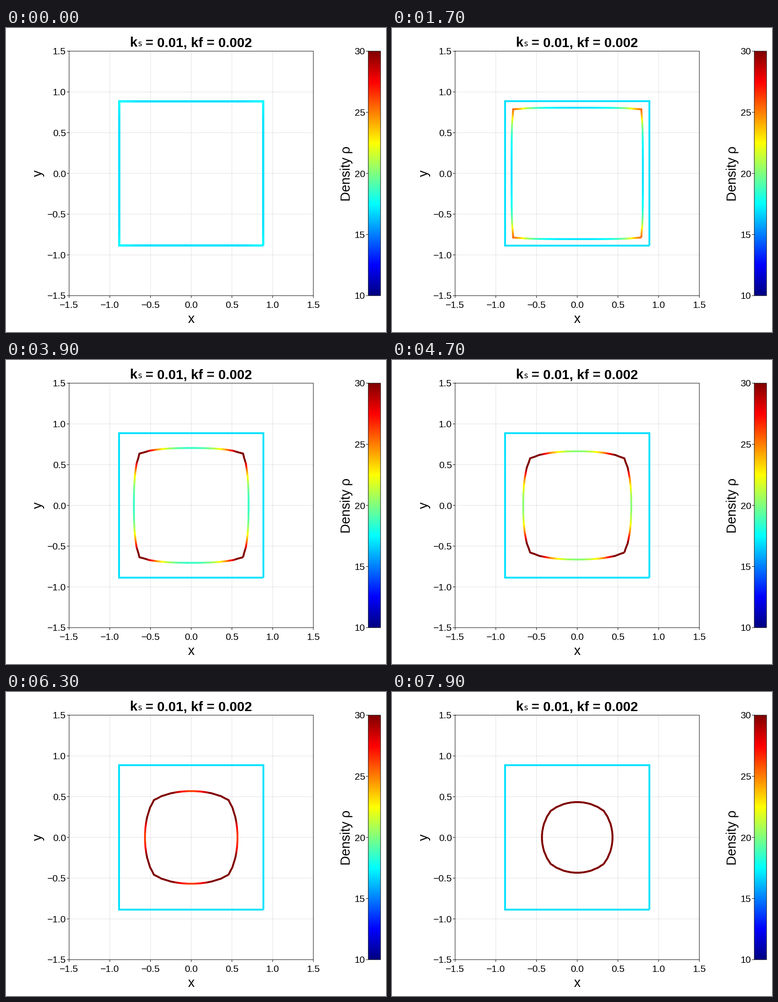
A matplotlib script that plays this animation: 837x669 px, repeating every 8000 ms.

```python
import numpy as np
import matplotlib.pyplot as plt
from matplotlib.animation import FuncAnimation
from matplotlib.collections import LineCollection

W, H = 837, 669
FRAMES, INTERVAL = 80, 100
LEFT, RIGHT, TOP, BOTTOM = 139, 677, 51, 589
CX, CY = (LEFT + RIGHT) / 2, (TOP + BOTTOM) / 2
SCALE = (RIGHT - LEFT) / 3

KS, KF = 0.01, 0.002        # spring stiffness, growth rate
PER_SIDE, CELLS = 15, 2     # springs on each side, cells on each spring
HALF = np.sqrt(np.pi) / 2   # square with the area of a unit circle
DT, SUBSTEPS = 0.1315, 20
SUB = 6                     # colour steps per spring
RHO_MIN, RHO_MAX = 10, 30
STROKE = 4


def jet(rho):
    x = np.clip((np.asarray(rho, float) - RHO_MIN) / (RHO_MAX - RHO_MIN), 0, 1)
    return np.stack([np.clip(1.5 - np.abs(4 * x - c), 0, 1) for c in (3, 2, 1)], -1)


def to_px(p):
    return np.stack([CX + SCALE * p[..., 0], CY - SCALE * p[..., 1]], -1)


# ---- tissue model: a ring of springs growing inwards ----
def square():
    corners = HALF * np.array([[1, -1], [1, 1], [-1, 1], [-1, -1]])
    f = np.arange(PER_SIDE)[:, None] / PER_SIDE
    return np.concatenate([a + f * (b - a)
                           for a, b in zip(corners, np.roll(corners, -1, 0))])


def edges(p):
    """Unit tangent and cell density of each spring."""
    d = np.roll(p, -1, 0) - p
    length = np.hypot(d[:, 0], d[:, 1])
    return d / length[:, None], CELLS / length


def step(p, dt):
    tr, rr = edges(p)
    tl, rl = np.roll(tr, 1, 0), np.roll(rr, 1)
    bis = tl + tr
    bis2 = (bis ** 2).sum(1)
    normal = np.stack([-bis[:, 1], bis[:, 0]], 1)
    growth = KF * (rl + rr) / 2 * 2 / bis2
    slide = KS * (rl - rr) / 2
    return p + dt * (growth[:, None] * normal + slide[:, None] * bis)


def simulate():
    p, out = square(), []
    for _ in range(FRAMES):
        for _ in range(SUBSTEPS):
            p = step(p, DT / SUBSTEPS)
        rho = edges(p)[1]
        out.append((p, (rho + np.roll(rho, 1)) / 2))
    return out


def stroke_pieces(p, rho):
    """Short overlapping mitred strokes with the colour of their middle."""
    n = len(p)
    u = np.arange(n * SUB + 1) / SUB
    k = np.arange(n + 1)
    p, rho = np.vstack([p, p[:1]]), np.append(rho, rho[0])
    q = to_px(np.stack([np.interp(u, k, p[:, 0]), np.interp(u, k, p[:, 1])], 1))
    d = np.diff(q, axis=0)
    lap = 0.4 * d / np.hypot(d[:, 0], d[:, 1])[:, None]
    mid = (q[1:] + q[:-1]) / 2
    start = np.vstack([q[:1], mid - lap])
    end = np.vstack([mid + lap, q[-1:]])
    return np.stack([start, q, end], 1), jet(np.interp(u, k, rho))


# ---- static parts, drawn in pixels ----
fig = plt.figure(figsize=(W / 72, H / 72), dpi=72, facecolor="white")
ax = fig.add_axes([0, 0, 1, 1])
ax.set_axis_off()


def line(xs, ys, color="black", lw=1, **kw):
    ax.plot(xs, ys, color=color, lw=lw, snap=False, **kw)


def text(x, y, s, size, ha="center", font="Liberation Sans", **kw):
    ax.text(x, y, s, fontsize=size, ha=ha, va="baseline", family=font,
            rotation_mode="anchor", **kw)


def box(x0, y0, x1, y1):
    line([x0, x1, x1, x0, x0], [y0, y0, y1, y1, y0], zorder=3,
         solid_joinstyle="miter", solid_capstyle="projecting")


for v in np.arange(-1.5, 1.6, 0.5):
    x, y = CX + SCALE * v, CY - SCALE * v
    label = f"{v:.1f}".replace("-", "\u2212")
    if abs(v) < 1.4:
        line([x, x], [TOP, BOTTOM], (0, 0, 0, 0.12), zorder=1)
        line([LEFT, RIGHT], [y, y], (0, 0, 0, 0.12), zorder=1)
    line([x, x], [BOTTOM, BOTTOM + 5], solid_capstyle="butt")
    line([LEFT - 5, LEFT], [y, y], solid_capstyle="butt")
    text(x, 615.5, label, 21)
    text(132, y + 7.5, label, 21, "right")
box(LEFT, TOP, RIGHT, BOTTOM)

text(273, 41, "k", 29.6, "left", weight="bold")
text(290, 40.5, "s", 17, "left", "DejaVu Sans")
text(542.3, 41, " = 0.01, kf = 0.002", 29.6, "right", weight="bold")
text(CX, 649, "x", 29)
text(78.5, CY, "y", 29, rotation=90)
text(758, CY + 0.5, "Density \u03c1", 29, rotation=90)

BAR0, BAR1 = 798, 825
ramp = jet(np.linspace(RHO_MAX, RHO_MIN, BOTTOM - TOP))[:, None]
ax.imshow(ramp, extent=(BAR0, BAR1, BOTTOM, TOP), aspect="auto",
          interpolation="nearest", zorder=1)
box(BAR0, TOP, BAR1, BOTTOM)
for rho in range(RHO_MIN, RHO_MAX + 1, 5):
    y = BOTTOM - (rho - RHO_MIN) / (RHO_MAX - RHO_MIN) * (BOTTOM - TOP)
    line([BAR0 - 5, BAR0], [y, y], solid_capstyle="butt")
    text(791, y + 7.5, str(rho), 21, "right")

# initial outline, left unjoined at its starting corner
ring = square()
outline = to_px(np.vstack([ring[::PER_SIDE], ring[:1]]))
line(outline[:, 0], outline[:, 1], jet(edges(ring)[1][0]), STROKE, zorder=4,
     solid_capstyle="butt", solid_joinstyle="miter")

curve = LineCollection([], linewidths=STROKE, capstyle="butt",
                       joinstyle="miter", zorder=5)
curve.set_snap(False)
ax.add_collection(curve, autolim=False)
ax.set_xlim(0, W)
ax.set_ylim(H, 0)

states = simulate()


def draw(i):
    pieces, colors = stroke_pieces(*states[i])
    curve.set_segments(pieces)
    curve.set_color(colors)
    return (curve,)


anim = FuncAnimation(fig, draw, frames=FRAMES, interval=INTERVAL,
                     repeat=True, repeat_delay=0, blit=False)
plt.show()
```
